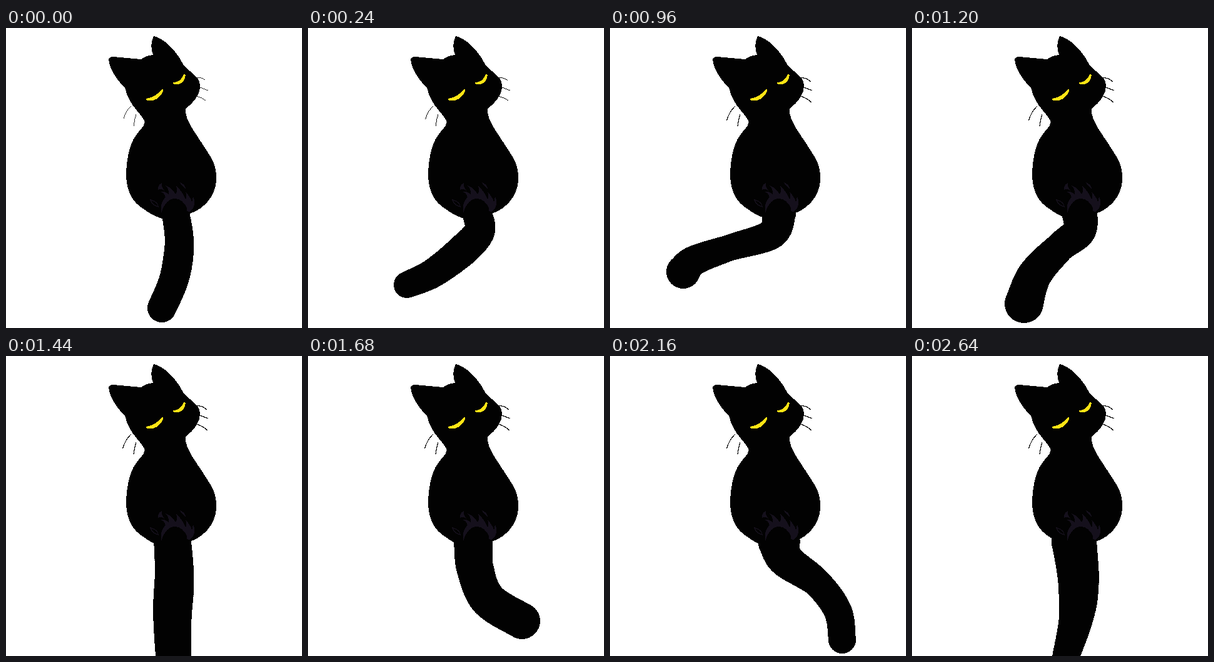
Write an HTML page that moves like this. It is 473 by 480 pixels and loops after 2880 ms.

```html
<!DOCTYPE html>
<html lang="en">
<head>
<meta charset="utf-8">
<title>Cat swishing its tail</title>
<style>
  html, body { margin: 0; width: 100%; height: 100%; overflow: hidden; background: #fff; }
  svg { display: block; width: 100%; height: 100%; shape-rendering: crispEdges; }
  .fur { fill: #020202; }
  .eye { fill: #ffe414; }
  .patch { fill: #15101c; }
  .curl { fill: none; stroke: #15101c; stroke-width: 1.3; }
  .whisker { fill: none; stroke: #020202; }
</style>
</head>
<body>
<svg viewBox="0 0 473 480">
  <path id="whiskers" class="whisker"/>
  <path id="tail" class="fur"/>
  <path class="fur" d="M222 150 C220 160 212 164 207 173 C197 186 192 213 192 237
    C193 260 201 278 219 289 C228 296 238 301 249 305 C262 308 280 306 294 297
    C319 288 334 268 336 245 C337 220 330 211 320 195 C303 168 285 147 287 129Z"/>
  <path class="fur" d="M222 152 C221 140 196 126 190 95 C180 87 165 66 164 50
    Q165 46 171 46 L216 50 Q224 44 235 43 Q229 28 236 13 C250 16 269 31 283 58
    C290 68 306 76 309 86 C313 101 304 116 287 129 V150Z"/>
  <path class="patch" d="M248 297 Q246 278 255 271 Q253 263 247 262 Q256 261 260 267
    Q261 257 255 252 Q266 256 271 266 Q275 261 272 253 Q281 260 287 274
    Q290 269 287 263 Q295 270 297 279 L299 270 C303 277 302 288 295 293
    Q288 296 289 288 C281 268 256 265 248 297Z"/>
  <path class="patch" d="M243 259 Q242 251 249 248 Q247 252 253 260 Q247 256 243 259Z
    M278 247 Q286 250 287 257 Q281 253 278 247Z"/>
  <path class="curl" d="M231 275 Q233 283 243 286 Q243 278 231 275Z"/>
  <path class="eye" d="M224 113 Q239 111 249 98 Q253 98 249 105 C243 114 235 118 226 116 Q223 115 224 113Z"/>
  <path class="eye" d="M267 87 Q279 87 284 74 Q288 72 286 80 C283 88 276 92 269 90 Q266 89 267 87Z"/>
</svg>
<script>
const STEP = 240;
const BASE_Y = 296;
const SAMPLES = 72;

// Tail poses: middle radius, tip radius, base x, then the centre line as x, y pairs
const poses = [
  [24, 23, 271, 277, 345, 269, 400, 249, 448],
  [26, 21, 270, 274, 325, 248, 355, 200, 392, 158, 411],
  [25, 23, 270, 270, 330, 235, 368, 175, 407, 137, 395],
  [17.5, 19, 270, 271, 322, 200, 334, 157, 317, 133, 300],
  [21, 27, 270, 258, 330, 190, 352, 135, 372, 117, 390],
  [24, 31, 268, 267, 325, 235, 352, 196, 395, 179, 441],
  [32, 28, 266, 269, 350, 266, 420, 268, 490],
  [29, 29, 264, 267, 340, 288, 390, 342, 424],
  [20, 19, 266, 278, 322, 340, 334, 395, 318, 424, 293],
  [23, 22, 270, 281, 326, 331, 363, 364, 408, 371, 454],
  [35, 24, 270, 284, 350, 284, 420, 268, 490],
  [31, 20, 259, 266, 360, 262, 420, 243, 490]
];

const mix = (a, b, t) => a + (b - a) * t;

// Catmull-Rom value on one axis, u from 0 to 1
function spline(values, u) {
  const last = values.length - 1;
  const i = Math.min(Math.floor(u * last), last - 1);
  const t = u * last - i;
  const at = n => values[Math.max(0, Math.min(last, n))];
  const [a, b, c, d] = [at(i - 1), at(i), at(i + 1), at(i + 2)];
  return b + t / 2 * (c - a + t * (2 * a - 5 * b + 4 * c - d + t * (3 * (b - c) + d - a)));
}

function circle(x, y, r) {
  const arc = dx => `a${r} ${r} 0 1 0 ${dx} 0`;
  return `M${x - r} ${y}${arc(2 * r)}${arc(-2 * r)}Z`;
}

// The tail is a run of circles; its base widens steadily through the loop
function tailPath(step) {
  const [mid, tip, baseX, ...line] = poses[step];
  const base = 22 + 1.3 * step;
  const points = [baseX, BASE_Y, ...line];
  const xs = points.filter((_, i) => i % 2 === 0);
  const ys = points.filter((_, i) => i % 2 === 1);
  let path = "";
  for (let i = 0; i <= SAMPLES; i++) {
    const u = i / SAMPLES;
    const r = u < 0.5 ? mix(base, mid, u * 2) : mix(mid, tip, u * 2 - 1);
    path += circle(spline(xs, u), spline(ys, u), r);
  }
  return path;
}

// Whiskers grow slightly longer and bolder over the first steps
const whiskerPath = grow =>
  `M200 125 Q191 133 ${188 - grow / 2} ${145 + grow}` +
  `M208 138 Q205 147 204 157` +
  `M302 80 Q312 78 ${318 + grow} ${83 + grow}` +
  `M310 95 L323 100` +
  `M304 109 Q313 111 ${319 + grow} ${116 + grow}`;

const tail = document.getElementById("tail");
const whiskers = document.getElementById("whiskers");
let shown = -1;

function draw() {
  const step = Math.floor(performance.now() / STEP) % poses.length;
  if (step !== shown) {
    shown = step;
    const grow = Math.min(step, 3);
    tail.setAttribute("d", tailPath(step));
    whiskers.setAttribute("d", whiskerPath(grow));
    whiskers.setAttribute("stroke-width", 0.8 + grow * 0.15);
  }
  requestAnimationFrame(draw);
}
draw();
</script>
</body>
</html>
```
